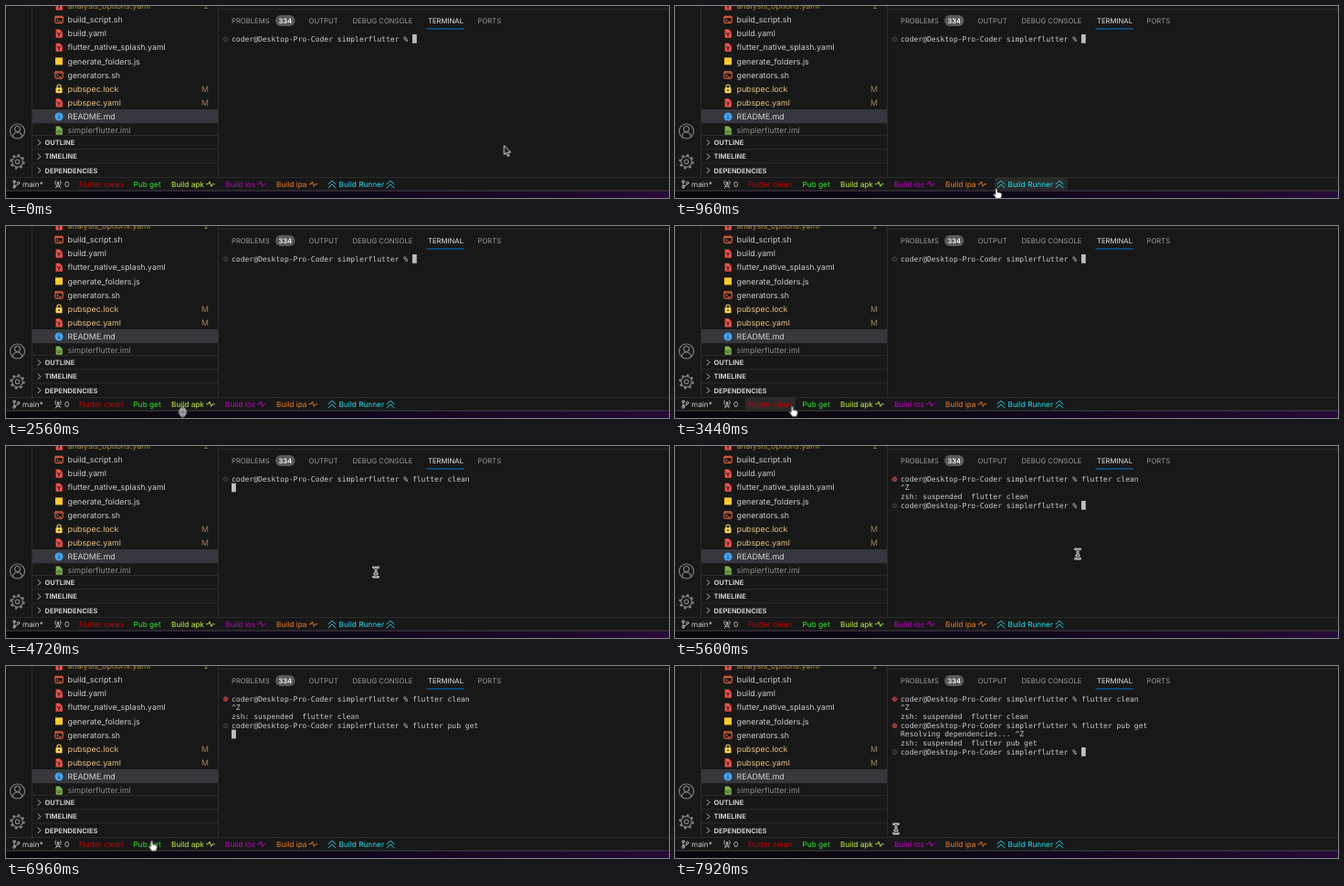
An HTML page for the animation above (8000 ms loop, 726 px wide and 210 px high).

```html
<!DOCTYPE html>
<html lang="en">
<head>
<meta charset="utf-8">
<title>Status bar commands</title>
<style>
html, body { margin: 0; width: 100%; height: 100%; overflow: hidden; background: #181818; }
svg { display: block; width: 726px; height: 210px; }
text { white-space: pre; text-rendering: geometricPrecision; font-family: Inter, Roboto, sans-serif; }
.file { font-size: 8.8px; }
.head { font-size: 7.5px; font-weight: 700; fill: #ccc; }
.tab { font-size: 7.7px; fill: #9d9d9d; }
.status { font-size: 8.25px; }
.term { font: 8.02px "DejaVu Sans Mono", "Liberation Mono", monospace; fill: #ccc; }
.line { fill: none; stroke-linecap: round; stroke-linejoin: round; }
</style>
</head>
<body>
<svg viewBox="0 0 726 210" id="stage">
  <defs>
    <linearGradient id="desk">
      <stop offset="0" stop-color="#08060c"/>
      <stop offset=".45" stop-color="#0e0716"/>
      <stop offset=".85" stop-color="#1d0a2b"/>
      <stop offset="1" stop-color="#270b3a"/>
    </linearGradient>
    <path id="doc" d="M-3.4-4.6h4.2l3 3v6.2h-7.2z"/>
    <path id="pulse" class="line" d="M0 0h2l1.4-2.8 1.9 5.4L6.800 0h2"/>
    <path id="up" class="line" d="M0 0l4-3.600 4 3.600M0 4l4-3.600 4 3.600"/>
    <g id="yaml"><use href="#doc" fill="#f4504a"/><path class="line" d="M-1.700-1l1.700 2 1.700-2M0 1v2" stroke="#181818"/></g>
    <g id="sh" class="line" stroke="#f0683f"><rect x="-4.200" y="-3.700" width="8.400" height="7.400" rx=".8"/><path d="M-4-2.500h8M-2.200-.600l1.500 1.300-1.500 1.300M.500 2.200h1.800"/></g>
    <g id="js"><rect x="-4" y="-4" width="8" height="8" fill="#ffca28"/></g>
    <g id="lock"><rect x="-3.500" y="-1.500" width="7" height="6" rx=".8" fill="#ffd54f"/><path class="line" d="M-2-1.500v-1.200a2 2 0 0 1 4 0v1.200" stroke="#ffd54f" stroke-width="1.100"/><circle cy="1.500" r=".9" fill="#181818"/></g>
    <g id="info"><circle r="4.500" fill="#42a5f5"/><path class="line" d="M0-.300v2.600M0-2.200v.1" stroke="#37373d" stroke-width="1.100"/></g>
    <g id="iml"><use href="#doc" fill="#7cb342"/><path class="line" d="M-.600 0l-1.300 1.300 1.300 1.300M.800 0l1.300 1.300-1.300 1.300" stroke="#181818" stroke-width=".8"/></g>
    <g id="idle"><circle r="2.200" fill="none" stroke="#666" stroke-width=".8"/></g>
    <g id="failed"><circle r="2.500" fill="#f14c4c"/><path class="line" d="M-1-1l2 2M1-1l-2 2" stroke="#181818" stroke-width=".8"/></g>
  </defs>

  <rect width="726" height="210" fill="#181818"/>
  <rect y="202" width="726" height="8" fill="url(#desk)"/>
  <rect y="201.600" width="726" height=".9" fill="#4a484c"/>
  <g id="files"></g>
  <g id="sections"></g>
  <g stroke="#2b2b2b">
    <path d="M28.500 0V187M232.500 0V187M233 3.500H726M0 187.500H726"/>
  </g>

  <g class="line" stroke="#868686" stroke-width="1.100">
    <circle cx="12.500" cy="137" r="8"/>
    <circle cx="12.500" cy="134.500" r="3"/>
    <path d="M7.500 143a5 5 0 0 1 10 0"/>
    <circle cx="12.500" cy="170.300" r="2.300"/>
    <circle cx="12.500" cy="170.300" r="5.800"/>
    <circle cx="12.500" cy="170.300" r="7.200" stroke-width="2" stroke-dasharray="2.600 3.055" stroke-linecap="butt"/>
  </g>

  <g id="tabs"></g>
  <rect x="295" y="10" width="21.500" height="12" rx="6" fill="#5a5a5a"/>
  <text x="305.700" y="18.900" text-anchor="middle" font-size="7.500" font-weight="600" fill="#f8f8f8">334</text>
  <rect x="460.500" y="24.500" width="41.500" height="1" fill="#0078d4"/>

  <g id="terminal"></g>
  <g id="status">
    <g class="line" stroke="#ccc" stroke-width=".8">
      <circle cx="9" cy="192" r="1.300"/><circle cx="9" cy="198" r="1.300"/><circle cx="13.500" cy="193.500" r="1.300"/>
      <path d="M9 193.300v3.400M13.500 194.800q-.3 1.700-4.500 1.700"/>
      <path d="M57 194l-2.500 5M57 194l2.500 5M55.300 197.300h3.400M54.500 191q-2 2 0 4.500M59.500 191q2 2 0 4.500"/>
      <circle cx="57" cy="193.300" r=".9"/>
    </g>
  </g>

  <g id="mouse">
    <path id="arrow" d="M0 0v10l2.300-2.100 1.700 3.900 1.700-.7-1.700-3.800h3.100z" fill="#111" stroke="#fff" stroke-width=".9" stroke-linejoin="round"/>
    <path id="hand" d="M-1.200 1q0-1.400 1.100-1.400t1.200 1.400v3l1.300-.3 1.200.4 1.200.3 1.100.7v2.700l-1 2v1.300h-5l-1-1.700-2.200-3q-.2-1.300 1-1l1.100.9z" fill="#fff" stroke="#111" stroke-width=".7"/>
    <g id="resize" class="line">
      <path d="M-3.500-1.200h7M-3.500 1.200h7M0-5v10M-2-3l2-2.200 2 2.200M-2 3l2 2.200 2-2.200" stroke="#fff" stroke-width="2"/>
      <path d="M-3.500-1.200h7M-3.500 1.200h7M0-5v10M-2-3l2-2.200 2 2.200M-2 3l2 2.200 2-2.200" stroke="#111" stroke-width=".7"/>
    </g>
    <g id="beam" class="line">
      <path d="M-2.500-5.300q2.500 0 2.500 1.500v7.600q0 1.500-2.500 1.500M2.500-5.300q-2.500 0-2.500 1.500M2.500 5.300q-2.500 0-2.500-1.500M-1.300 1.800h2.600" stroke="#fff" stroke-width="2.600"/>
      <path d="M-2.500-5.300q2.500 0 2.500 1.500v7.600q0 1.500-2.500 1.500M2.500-5.300q-2.500 0-2.500 1.500M2.500 5.300q-2.500 0-2.500-1.500M-1.300 1.800h2.600" stroke="#111" stroke-width=".8"/>
    </g>
  </g>
</svg>
<script>
const LOOP = 8000;
const $ = id => document.getElementById(id);

function add(parent, tag, attrs, content) {
  const node = document.createElementNS('http://www.w3.org/2000/svg', tag);
  for (const key in attrs) node.setAttribute(key, attrs[key]);
  if (content) node.textContent = content;
  return parent.appendChild(node);
}
const label = (parent, cls, x, y, content, fill) =>
  add(parent, 'text', fill ? { class: cls, x, y, fill } : { class: cls, x, y }, content);
const animate = (node, frames) => node.animate(frames, { duration: LOOP, iterations: Infinity });

// Hidden at first, flips at each of the given times.
function toggle(node, ...times) {
  const frames = [0, ...times].map((t, i) => ({ offset: t / LOOP, opacity: i % 2, easing: 'step-end' }));
  animate(node, frames);
}

// Explorer
const GOLD = '#e8c07d', GREY = '#ccc';
add($('files'), 'rect', { x: 29, y: 113, width: 203, height: 15.2, fill: '#37373d' });
[
  ['yaml', 'analysis_options.yaml', '#ad8a2c', '2'],
  ['sh', 'build_script.sh', GREY],
  ['yaml', 'build.yaml', GREY],
  ['yaml', 'flutter_native_splash.yaml', GREY],
  ['js', 'generate_folders.js', GREY],
  ['sh', 'generators.sh', GREY],
  ['lock', 'pubspec.lock', GOLD, 'M'],
  ['yaml', 'pubspec.yaml', GOLD, 'M'],
  ['info', 'README.md', '#d4d4d4'],
  ['iml', 'simplerflutter.iml', '#8c8c8c']
].forEach(([icon, name, fill, mark], i) => {
  const y = -0.2 + i * 15.15;
  add($('files'), 'use', { href: '#' + icon, x: 58, y });
  label($('files'), 'file', 67.5, y + 3.2, name, fill);
  if (mark) label($('files'), 'file', mark === 'M' ? 214 : 216.5, y + 3.2, mark, '#a08350');
});

['OUTLINE', 'TIMELINE', 'DEPENDENCIES'].forEach((name, i) => {
  const y = 141.5 + i * 15.2, box = $('sections');
  add(box, 'rect', { x: 29, y, width: 203, height: 15.5, fill: '#181818' });
  add(box, 'path', { d: `M29 ${y}h203`, stroke: '#2b2b2b' });
  add(box, 'path', { class: 'line', d: `M35 ${y + 5}l2.900 2.900-2.900 2.900`, stroke: '#ccc', 'stroke-width': .9 });
  label(box, 'head', 42.5, y + 10.6, name);
});

[[247, 'PROBLEMS'], [331.5, 'OUTPUT'], [379.5, 'DEBUG CONSOLE'], [462, 'TERMINAL', '#e7e7e7'], [516.5, 'PORTS']]
  .forEach(([x, name, fill]) => {
    const tab = label($('tabs'), 'tab', x, 18.9, name);
    if (fill) tab.style.fill = fill;
  });

// Terminal: text and marks on a character grid
const CELL = 4.828, ROW = 9.67, LEFT = 247, TOP = 36;
const PROMPT = 'coder@Desktop-Pro-Coder simplerflutter % ';
const TYPE_CLEAN = 4240, STOP_CLEAN = 5280, TYPE_GET = 6720, RESOLVE = 7120, STOP_GET = 7600;

const print = (row, col, content, from) =>
  toggle(label($('terminal'), 'term', LEFT + col * CELL, TOP + 2.8 + row * ROW, content), from);
const mark = (row, icon, ...times) =>
  toggle(add($('terminal'), 'use', { href: '#' + icon, x: 240.5, y: TOP + .2 + row * ROW }), ...times);
const block = (row, col, ...times) =>
  toggle(add($('terminal'), 'rect', {
    x: LEFT + col * CELL, y: TOP - 5 + row * ROW, width: 4.8, height: 9.7, fill: '#bdbdbd'
  }), ...times);

print(0, 0, PROMPT, 0);
print(0, PROMPT.length, 'flutter clean', TYPE_CLEAN);
print(1, 0, '^Z', STOP_CLEAN);
print(2, 0, 'zsh: suspended  flutter clean', STOP_CLEAN);
print(3, 0, PROMPT, STOP_CLEAN);
print(3, PROMPT.length, 'flutter pub get', TYPE_GET);
print(4, 0, 'Resolving dependencies... ', RESOLVE);
print(4, 26, '^Z', STOP_GET);
print(5, 0, 'zsh: suspended  flutter pub get', STOP_GET);
print(6, 0, PROMPT, STOP_GET);

mark(0, 'idle', 0, STOP_CLEAN);
mark(0, 'failed', STOP_CLEAN);
mark(3, 'idle', STOP_CLEAN, STOP_GET);
mark(3, 'failed', STOP_GET);
mark(6, 'idle', STOP_GET);

block(0, PROMPT.length, 0, TYPE_CLEAN);
block(1, 0, TYPE_CLEAN, STOP_CLEAN);
block(3, PROMPT.length, STOP_CLEAN, TYPE_GET);
block(4, 0, TYPE_GET, RESOLVE);
block(4, 26, RESOLVE, STOP_GET);
block(6, PROMPT.length, STOP_GET);

// Status bar: text, colour, text x, hover box, hover times, icons
const bar = $('status'), BASE = 197.8;
label(bar, 'status', 18, BASE, 'main*', GREY);
label(bar, 'status', 64, BASE, '0', GREY);
[
  ['Flutter clean', '#d00000', 80, 77, 132, [3200, 4320]],
  ['Pub get', '#2bea2b', 139.5, 136, 174, [2800, 3200, 6240, 6960]],
  ['Build apk', '#c4f53c', 181, 178, 232, [2240, 2400], ['pulse', 219.5]],
  ['Build ios', '#c400c4', 240, 237, 288, [1760, 2160], ['pulse', 275.5]],
  ['Build ipa', '#ee7f22', 296, 292, 345, [1360, 1760], ['pulse', 332]],
  ['Build Runner', '#22e0ee', 364.5, 350, 429.5, [760, 1360], ['up', 353], ['up', 417]]
].forEach(([name, color, x, left, right, times, ...icons]) => {
  toggle(add(bar, 'rect', { x: left, y: 188, width: right - left, height: 13.6, fill: '#2a2a2a' }), ...times);
  label(bar, 'status', x, BASE, name, color);
  for (const [icon, ix] of icons)
    add(bar, 'use', { href: '#' + icon, x: ix, y: 194.8, stroke: color, 'stroke-width': .9 });
});

// Pointer
const path = [
  [0, 545.5, 152.5], [160, 545.5, 152.5], [800, 353, 198], [960, 352, 200], [1200, 350, 200],
  [1520, 318, 200], [1920, 262, 200], [2240, 222, 201], [2560, 193.5, 203.5], [2960, 155, 200],
  [3440, 128.5, 197.5], [4160, 128.5, 195.5], [4720, 405, 138], [5120, 441, 118], [5680, 441, 118],
  [6160, 167, 186.5], [6400, 156, 192], [6880, 156, 192], [7440, 242, 178], [8000, 242, 178]
];
animate($('mouse'), path.map(([t, x, y]) => ({
  offset: t / LOOP, transform: `translate(${x}px, ${y}px)`, easing: 'ease-in-out'
})));
toggle($('arrow'), 0, 720);
toggle($('hand'), 720, 2400, 2720, 4400, 6080, 7040);
toggle($('resize'), 2400, 2720);
toggle($('beam'), 4400, 6080, 7040);
</script>
</body>
</html>
```
